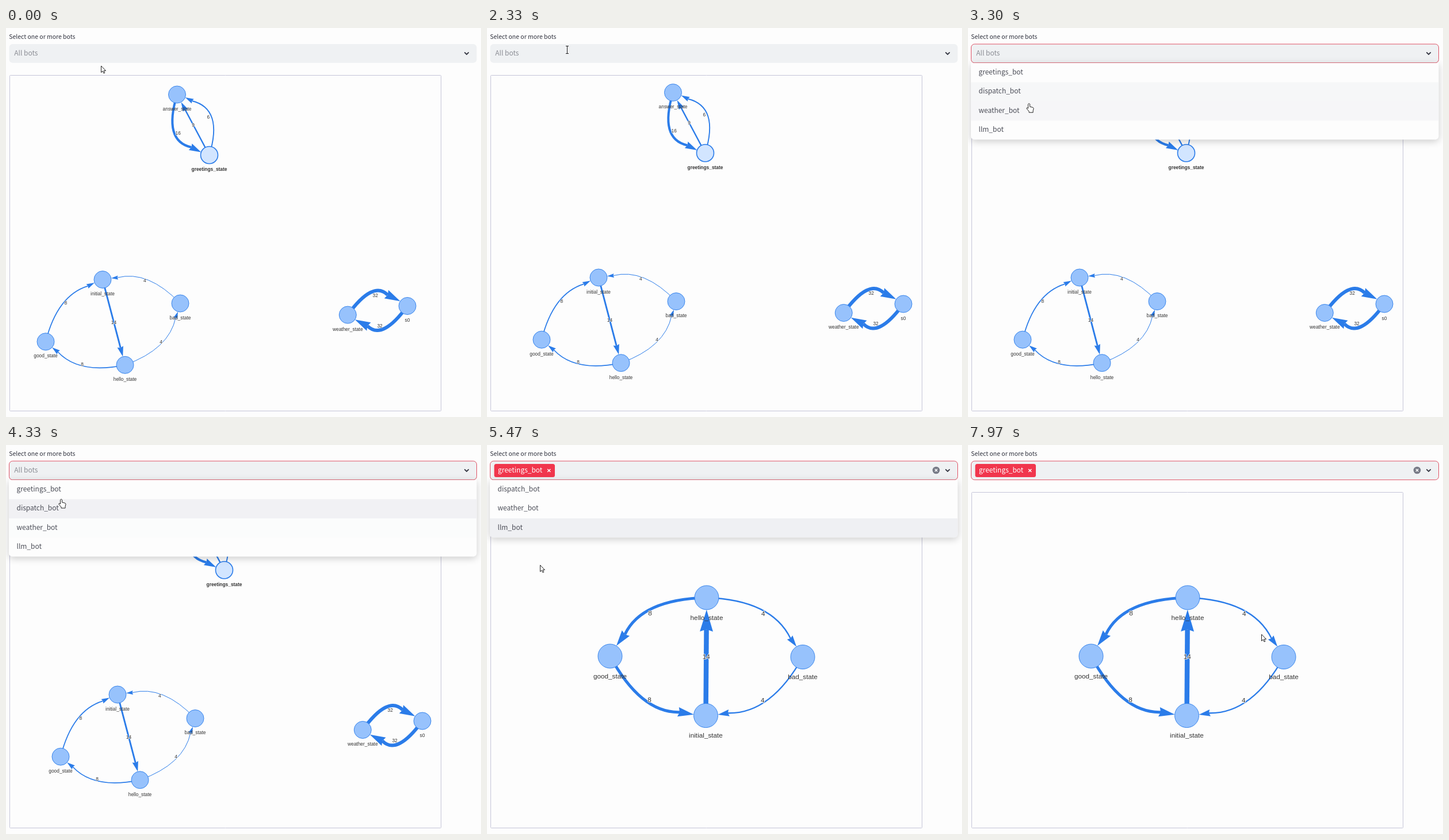
Write an HTML page with a canvas that moves like this. It is 826x678 px and loops after 8000 ms.

```html
<!DOCTYPE html>
<html lang="en">
<head>
<meta charset="utf-8">
<title>Bot graph</title>
<style>
  html, body { margin: 0; width: 100%; height: 100%; overflow: hidden; background: #fdfdfd; }
  canvas { display: block; }
</style>
</head>
<body>
<canvas id="stage" width="826" height="678"></canvas>
<script>
const ctx = document.getElementById('stage').getContext('2d');
const LOOP = 8000;
const UI = '"Noto Sans CJK JP", "Noto Sans CJK SC", "Noto Sans CJK", "Open Sans", sans-serif';
const ARIAL = '"Liberation Sans", Arial, sans-serif';
const BLUE = '#2b7ce9', INK = '#31333f';

const OPEN = 2450, PICK = 4750, CLOSE = 7080;
const BLANK = 4970, RELOAD = 5060;
const ROW = 33.4, LIST_TOP = 61;

const allBots = ['greetings_bot', 'dispatch_bot', 'weather_bot', 'llm_bot'];

// Edges: from, to, label, line width, bow (share of the chord length)
const fullGraph = {
  scale: 0.6,
  selected: 'greetings_state',
  nodes: {
    answer_state: [297.5, 116], greetings_state: [353.5, 221.5],
    initial_state: [168, 438.5], good_state: [69, 546.7],
    hello_state: [207, 587.3], bad_state: [303, 480],
    weather_state: [594.3, 500], s0: [698, 484.5]
  },
  edges: [
    ['answer_state', 'greetings_state', 16, 4, -0.25],
    ['greetings_state', 'answer_state', 9, 2.4, 0],
    ['greetings_state', 'answer_state', 6, 1.9, -0.25],
    ['good_state', 'initial_state', 8, 1.7, 0.135],
    ['hello_state', 'good_state', 8, 1.7, 0.135],
    ['initial_state', 'hello_state', 14, 2.9, 0],
    ['bad_state', 'initial_state', 4, 1, -0.14],
    ['hello_state', 'bad_state', 4, 1, -0.135],
    ['weather_state', 's0', 32, 6, 0.255],
    ['s0', 'weather_state', 32, 6, 0.255]
  ]
};
const botGraph = {
  scale: 0.84,
  nodes: {
    hello_state: [382, 266], good_state: [214, 368],
    bad_state: [549, 369.5], initial_state: [380.5, 471.5]
  },
  edges: [
    ['hello_state', 'good_state', 8, 5, -0.143],
    ['hello_state', 'bad_state', 4, 2.4, 0.143],
    ['good_state', 'initial_state', 8, 5, -0.143],
    ['bad_state', 'initial_state', 4, 2.4, 0.143],
    ['initial_state', 'hello_state', 14, 8.5, 0]
  ]
};

// Pointer tip: time, x, y
const pointerPath = [
  [0, 165.5, 66], [750, 140, 120], [900, 140, 120], [1600, 166, 116.5],
  [1750, 166, 116.5], [2280, 139.5, 38], [2480, 139.5, 38], [3180, 107, 124],
  [3330, 106, 132], [3900, 106, 135], [4330, 96, 94], [4620, 94, 78],
  [4820, 94, 78], [5400, 92.5, 207], [5550, 92.5, 212], [6500, 780, 165],
  [6770, 804, 80], [6980, 801, 44], [7150, 801, 44], [7900, 512, 328], [7970, 510.5, 330]
];

// Highlighted row: time, index
const hovers = [
  [0, -1], [2780, 0], [3010, 1], [3220, 2], [4200, 1], [4390, 0],
  [PICK, 0], [4900, 1], [5050, 2], [6620, 1], [6730, 0]
];

const clamp = v => Math.max(0, Math.min(1, v));
const ramp = (t, start, len) => clamp((t - start) / len);
const ease = k => k * k * (3 - 2 * k);

function pointerAt(t) {
  const i = pointerPath.findIndex(p => p[0] > t);
  if (i < 0) return pointerPath[pointerPath.length - 1].slice(1);
  const [t0, x0, y0] = pointerPath[i - 1], [t1, x1, y1] = pointerPath[i];
  const k = ease((t - t0) / (t1 - t0));
  return [x0 + (x1 - x0) * k, y0 + (y1 - y0) * k];
}

function hoverLevel(t, row) {
  let level = 0;
  for (const [at, index] of hovers) {
    if (at > t) break;
    const k = at === PICK ? 1 : ramp(t, at, 160);
    level += ((index === row ? 1 : 0) - level) * k;
  }
  return level;
}

function text(str, x, y, font, color, align = 'left') {
  ctx.font = font;
  ctx.textAlign = align;
  ctx.fillStyle = color;
  ctx.fillText(str, x, y);
}

function box(x, y, w, h, r, fill, stroke) {
  ctx.beginPath();
  ctx.roundRect(x, y, w, h, r);
  if (fill) { ctx.fillStyle = fill; ctx.fill(); }
  if (stroke) { ctx.strokeStyle = stroke; ctx.lineWidth = 1; ctx.stroke(); }
}

function line(points, color, width) {
  ctx.beginPath();
  points.forEach(([x, y]) => ctx.lineTo(x, y));
  ctx.strokeStyle = color;
  ctx.lineWidth = width;
  ctx.stroke();
}

function cross(x, y, r, width) {
  line([[x - r, y - r], [x + r, y + r]], '#fff', width);
  line([[x - r, y + r], [x + r, y - r]], '#fff', width);
}

function drawEdge(a, b, label, width, bow, scale) {
  const dx = b[0] - a[0], dy = b[1] - a[1];
  const via = [(a[0] + b[0]) / 2 + 2 * bow * dy, (a[1] + b[1]) / 2 - 2 * bow * dx];
  const at = t => [0, 1].map(i =>
    (1 - t) ** 2 * a[i] + 2 * t * (1 - t) * via[i] + t * t * b[i]);

  // Find where the curve meets the rim of the end node
  let lo = 0.5, hi = 1;
  for (let i = 0; i < 20; i++) {
    const mid = (lo + hi) / 2, p = at(mid);
    if (Math.hypot(p[0] - b[0], p[1] - b[1]) > 25 * scale) lo = mid; else hi = mid;
  }
  const tip = at(lo), back = at(lo - 0.1);
  const angle = Math.atan2(tip[1] - back[1], tip[0] - back[0]);
  const size = 15 * scale + 3 * width;
  const core = [tip[0] - 0.9 * size * Math.cos(angle), tip[1] - 0.9 * size * Math.sin(angle)];

  ctx.strokeStyle = ctx.fillStyle = BLUE;
  ctx.lineWidth = width;
  ctx.beginPath();
  ctx.moveTo(...a);
  if (bow) ctx.quadraticCurveTo(...via, ...core); else ctx.lineTo(...core);
  ctx.stroke();

  ctx.save();
  ctx.translate(...tip);
  ctx.rotate(angle);
  ctx.scale(size, size);
  ctx.beginPath();
  ctx.moveTo(0, 0);
  ctx.lineTo(-1, 0.3);
  ctx.lineTo(-0.9, 0);
  ctx.lineTo(-1, -0.3);
  ctx.fill();
  ctx.restore();

  const [x, y] = at(0.5), px = 14 * scale;
  ctx.font = `${px}px ${ARIAL}`;
  ctx.textAlign = 'center';
  ctx.lineWidth = 2 * scale;
  ctx.strokeStyle = '#fff';
  ctx.strokeText(label, x, y + px * 0.36);
  text(label, x, y + px * 0.36, ctx.font, '#343434', 'center');
}

function drawGraph({ scale, nodes, edges, selected }) {
  for (const [from, to, label, width, bow] of edges)
    drawEdge(nodes[from], nodes[to], label, width, bow, scale);
  for (const [name, [x, y]] of Object.entries(nodes)) {
    const on = name === selected;
    ctx.beginPath();
    ctx.arc(x, y, 25 * scale, 0, 7);
    ctx.fillStyle = on ? '#d2e5ff' : '#97c2fc';
    ctx.fill();
    ctx.strokeStyle = BLUE;
    ctx.lineWidth = on ? 1.6 : 0.9;
    ctx.stroke();
    text(name, x, y + 46.3 * scale, `${on ? 'bold ' : ''}${14 * scale}px ${ARIAL}`, '#343434', 'center');
  }
}

function drawPanel(t) {
  if (t >= BLANK && t < RELOAD) return;
  box(6.5, 82.5, 750, 585, 1, null, '#c5c5d8');
  if (t >= RELOAD) return drawGraph(botGraph);
  const k = ease(ramp(t, 900, 700));
  ctx.save();
  ctx.translate(26 * k, -3.5 * k);
  drawGraph(fullGraph);
  ctx.restore();
}

function drawSelect(t) {
  text('Select one or more bots', 5.3, 18.5, `10.45px ${UI}`, INK);
  box(5.5, 28, 813, 32.7, 6, '#eff1f3', t >= OPEN ? '#de5366' : null);
  if (t >= PICK) {
    box(12.5, 33, 105.5, 23, 3.5, '#f1364d');
    text('greetings_bot', 19, 48, `11.95px ${UI}`, '#fff');
    cross(107.8, 44.5, 2.6, 1.4);
    ctx.beginPath();
    ctx.arc(781, 44, 6.3, 0, 7);
    ctx.fillStyle = '#777a86';
    ctx.fill();
    cross(781, 44, 2.2, 1.3);
  } else {
    text('All bots', 14.3, 48, `11.95px ${UI}`, '#8b8d94');
  }
  line([[797.3, 42.3], [801, 46], [804.7, 42.3]], INK, 1.8);
}

function drawList(t) {
  const alpha = ramp(t, OPEN, 150) * (1 - ramp(t, CLOSE, 120));
  if (!alpha) return;
  const rows = t < PICK ? allBots : allBots.slice(1);
  const height = rows.length * ROW;
  ctx.save();
  ctx.globalAlpha = alpha;
  ctx.shadowColor = 'rgba(0,0,0,.2)';
  ctx.shadowBlur = 13;
  ctx.shadowOffsetY = 3;
  box(5, LIST_TOP, 813.5, height, [0, 0, 6, 6], '#fdfdfd');
  ctx.shadowColor = 'transparent';
  ctx.clip();
  rows.forEach((name, i) => {
    const y = LIST_TOP + i * ROW;
    ctx.globalAlpha = alpha * hoverLevel(t, i);
    ctx.fillStyle = '#eff0f3';
    ctx.fillRect(5, y, 814, ROW);
    ctx.globalAlpha = alpha;
    text(name, 18.5, y + 20, `11.95px ${UI}`, '#4b4d57');
  });
  ctx.restore();
}

const shapes = {
  arrow: new Path2D('M0 0V11.5L2.7 9L4.5 13L6.3 12.2L4.6 8.4H8Z'),
  hand: new Path2D('M-1.5 1.5Q0 -1 1.5 1.5V6L6 7Q8 7.5 8 9.5L7 13V16H0V14L-4 9.5Q-4.5 7 -2.5 8L-1.5 9Z'),
  beam: new Path2D('M-2.5 -6.5H2.5M0 -6.5V6.5M-2.5 6.5H2.5')
};

function drawPointer(t) {
  const [x, y] = pointerAt(t);
  const listEnd = LIST_TOP + ROW * (t < PICK ? 4 : 3);
  const overList = t > OPEN && t < CLOSE && y >= LIST_TOP && y < listEnd;
  const overBox = y > 28 && y < LIST_TOP;
  const kind = overList || (overBox && x > 770) ? 'hand' : overBox ? 'beam' : 'arrow';
  ctx.save();
  ctx.translate(x, y);
  ctx.lineWidth = 1;
  ctx.strokeStyle = '#222';
  ctx.fillStyle = '#fff';
  if (kind !== 'beam') ctx.fill(shapes[kind]);
  ctx.stroke(shapes[kind]);
  ctx.restore();
}

function frame() {
  const t = performance.now() % LOOP;
  ctx.fillStyle = '#fdfdfd';
  ctx.fillRect(0, 0, 826, 678);
  drawPanel(t);
  drawSelect(t);
  drawList(t);
  drawPointer(t);
  requestAnimationFrame(frame);
}
frame();
</script>
</body>
</html>
```
